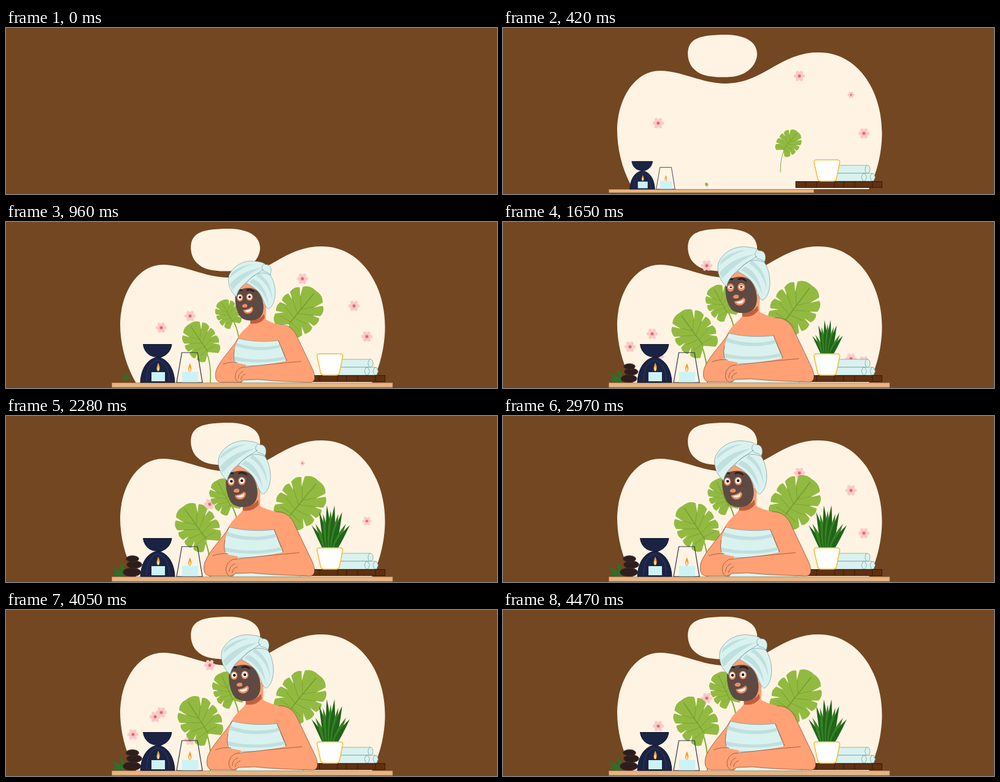
These frames come from a looping animation (800x272 px, 4.5 s). An HTML page:

```html
<!DOCTYPE html>
<html lang="en">
<head>
<meta charset="utf-8">
<title>Spa</title>
<style>
html, body { margin: 0; width: 100%; height: 100%; overflow: hidden; background: #734722; }
svg { display: block; width: 100%; height: 100%; }
.skin { fill: #ffa175; }
.line { fill: none; stroke: #7a4433; stroke-width: .7; stroke-linecap: round; }
.cloth { fill: #daf2ef; stroke: #6d979c; stroke-width: .7; }
.fold { fill: #bfe0df; }
.navy { fill: #1b2345; stroke: #11172e; }
.wax { fill: #cbf3f5; }
.wood { fill: #5f3113; stroke: #381a08; }
.stone { fill: #2d1e1d; stroke: #4a3532; stroke-width: .6; }
.stem { fill: none; stroke: #7fac38; stroke-width: 2; stroke-linecap: round; }
</style>
</head>
<body>
<svg viewBox="0 0 800 272" preserveAspectRatio="none">
<defs>
  <g id="leaf"></g>
  <g id="flower"></g>
  <g id="flame">
    <path d="M0-7Q3-1 2.600 2.500Q2 7 0 7T-2.600 2.500Q-2.500 0 0-7Z" fill="#f09a32"/>
    <path d="M0-1Q1.500 2 1.300 4Q1 6.500 0 6.500T-1.300 4Q-1.500 2 0-1Z" fill="#ffe9a8"/>
  </g>
</defs>
<rect width="800" height="272" fill="#734722"/>

<g id="blob" fill="#fff3e3">
  <path d="M212 264C195 235 186 200 186 167C187 115 215 70 256 70C290 70 325 91 362 91C425 91 450 40 515 40C576 40 617.500 100 617.500 172C617.500 210 606 245 596 264Z"/>
  <path d="M355 11C385 10 413 17 414 42C414 60 398 78 372 80C345 82 322 79 312 68C300 58 298 35 306 25C315 13 335 12 355 11Z"/>
</g>
<g id="petals"></g>

<g id="leafBack">
  <path class="stem" d="M358 133Q377 155 379 190Q381 208 386 222"/>
  <use href="#leaf" transform="translate(358 133) rotate(-28) scale(.62)"/>
</g>
<g id="leafRight">
  <path class="stem" d="M477 142Q451 172 452 236"/>
  <use href="#leaf" transform="translate(477 142) rotate(38) scale(.94)"/>
</g>
<g id="leafLeft">
  <path class="stem" d="M312 183Q334 212 333 263"/>
  <use href="#leaf" transform="translate(312 183) rotate(-36) scale(.84)"/>
</g>

<g id="tray">
  <g class="cloth">
    <path d="M545 225H594V238H545Z"/><ellipse cx="594" cy="231.500" rx="4" ry="6.500"/>
    <path d="M538 238H602V251H538Z"/>
    <path id="hex" d="M584 244.500L586.500 238.500H590L592.500 244.500L590 250.500H586.500Z"/>
    <use href="#hex" x="14"/>
  </g>
  <rect class="wood" x="477" y="251.500" width="140.500" height="10"/>
  <path d="M493 251V261M511 251V261M540 251V261M555 251V261M573 251V261M602 251V261" stroke="#381a08"/>
</g>
<g id="plant"></g>
<g id="pot">
  <path d="M511 216H544Q549.500 216 548.500 221L543.500 246Q542.500 251 538 251H518Q513.500 251 512.500 246L507 221Q506 216 511 216Z" fill="#fff" stroke="#f0bd35" stroke-width="1.500"/>
</g>

<g id="sprig" fill="#2c702b">
  <path d="M195 262Q178 260 174 249Q187 250 195 262Z"/>
  <path d="M195 262Q184 250 187 240Q195 250 195 262Z"/>
  <path d="M195 262Q182 265 173 259Q184 255 195 262Z"/>
</g>
<g id="stones" class="stone">
  <ellipse cx="205" cy="256" rx="14.500" ry="7.300"/>
  <ellipse cx="209" cy="243.500" rx="12.500" ry="6.500"/>
  <ellipse cx="206" cy="234" rx="10.500" ry="5.300"/>
</g>

<g id="woman">
  <path class="skin" d="M386 143L387 153Q382 160 374 167Q364 176 358 192L354 226H452L470 180Q468 164 448 159Q422 153 414 147L415 118H390Z"/>
  <path fill="#c25f3c" d="M386 147Q401 151 411 137L412 145Q404 157 386 155Z"/>
  <path class="cloth" d="M364 182C385 188 415 189 437 186L451 222V232H356Q352 205 364 182Z"/>
  <path class="fold" d="M361 190Q400 204 440 193L442 198Q400 210 359 196ZM356 215Q400 226 449 215L451 220Q410 230 356 222Z"/>
  <path class="cloth" d="M368 254H480V264H368Z"/>
  <path class="skin" d="M364 182C354 199 331 221 324 240C321 252 323 261 332 262H372L378 230L357 226Q353 205 364 182Z"/>
  <path class="line" d="M364 182C354 199 331 221 324 240C321 252 323 261 332 262H370M357 203Q354 222 359 226M337 229Q350 224 362 226"/>
  <path class="skin" d="M430 159C452 154 464 163 471 179L499 238C505 252 504 262 495 262Q440 261 400 257L374 258Q367 263 364 262Q357 257 359 248Q361 239 370 235Q420 230 453 223L451 220L437 186Z"/>
  <path class="line" d="M440 157C455 156 465 165 471 179L499 238C505 252 504 262 495 262Q440 261 400 257L374 258Q367 263 364 262Q357 257 359 248Q361 239 370 235Q420 229 478 224M437 186L452 222M364 255Q364 246 373 242M369 257Q369 250 377 247"/>
  <path class="skin" d="M360 100Q366 86 379 80Q402 88 410 114L408 140H385Z"/>
  <path d="M359 101Q364 92 373 91Q388 87 399 95Q405 102 408 112C412 126 410 139 402 145C393 151 380 150 372 146C361 139 357 115 359 101Z" fill="#5e4a43"/>
  <path d="M360 97Q364 92 370 94M380 94Q386 91 392 96" fill="none" stroke="#2a1d1c" stroke-width="2.600" stroke-linecap="round"/>
  <g fill="#f28c60">
    <ellipse cx="367" cy="107.500" rx="5.600" ry="6.700"/><ellipse cx="384.500" cy="106.500" rx="6" ry="6.700"/>
    <path d="M371 122Q374 117 380 120Q382 125 377 125.500Q371 126 371 122Z"/>
    <path d="M373 130Q383 129 388 124Q393 126 390 132Q386 138 379 136.500Q374 135 373 130Z"/>
  </g>
  <path d="M376 131Q384 130.500 388 127Q389 131 385 133Q379 135 376 131Z" fill="#fff"/>
  <g id="eyes">
    <ellipse cx="367" cy="107" rx="3.900" ry="4.800" fill="#fff"/><ellipse cx="384.500" cy="106" rx="4.200" ry="4.800" fill="#fff"/>
    <circle cx="367.500" cy="107" r="2.300" fill="#2a1712"/><circle cx="384.500" cy="106" r="2.300" fill="#2a1712"/>
  </g>
  <path class="cloth" d="M361 106C350 97 344 82 347 68C353 50 375 38 394 41C405 42 411 44 413 47C424 46 426 58 422 66C430 78 433 96 430 110C428 121 422 128 418 128C412 124 410 110 404 101C398 92 388 86 379 81C370 86 362 96 361 106Z"/>
  <path class="fold" d="M349 83Q370 58 406 53Q377 66 353 93ZM352 62Q370 47 392 46Q370 52 349 71ZM390 73Q414 83 419 120Q409 91 384 79ZM402 64Q425 78 426 112Q420 82 397 68Z"/>
  <path class="line" d="M379 81C388 68 400 57 422 66M361 104Q364 85 410 56M410 46Q403 53 411 60Q419 61 423 66" style="stroke:#6d979c"/>
</g>

<g id="table">
  <rect x="172.500" y="263.500" width="457.500" height="7.500" fill="#e9b481" stroke="#a8703f" stroke-width=".6"/>
  <path class="navy" d="M223.500 200.500H270Q268 216 253 221.500Q241 222 234 218Q225 212 223.500 200.500Z"/>
  <path class="navy" d="M247 221.500C264 224 274 241 275 263H219C220 241 230 224 247 221.500Z"/>
  <path d="M229 261Q229 231 247 226Q266 231 266 261" fill="none" stroke="#36406a" stroke-width=".8"/>
  <path class="wax" d="M237 246H259V261H237Z"/>
  <use href="#flame" x="248" y="237.500"/>
  <path d="M286.500 214H312L320 263H278Z" fill="none" stroke="#2c3448" stroke-width="1.200"/>
  <path class="wax" d="M287 245.500H313V262.500H287Z"/>
  <use href="#flame" x="299.500" y="238.500"/>
</g>
</svg>
<script>
const LOOP = 4500;
const $ = id => document.getElementById(id);
const clamp = u => Math.min(1, Math.max(0, u));
const outCubic = u => 1 - (1 - clamp(u)) ** 3;
const outBack = (u, s) => {
  const v = clamp(u) - 1;
  return 1 + (s + 1) * v ** 3 + s * v * v;
};
const wave = (t, start, period) => Math.sin(2 * Math.PI * (t - start) / period);
const repeat = (n, make) => Array.from({ length: n }, (_, i) => make(i)).join("");

// Scale, turn and shift a group about a fixed point
function grow(id, x, y, k, turn = 0, dx = 0) {
  const el = $(id);
  el.style.display = k > .01 ? "" : "none";
  el.setAttribute("transform",
    `translate(${x + dx} ${y}) rotate(${turn}) scale(${k}) translate(${-x} ${-y})`);
}

// Half a leaf: five lobes around a centre, split by narrow notches
function halfLeaf() {
  const step = .56;
  const rim = a => 43 + 6 * Math.cos(2 * a);
  const at = (a, k = 1) => `${rim(a) * k * Math.sin(a)} ${-rim(a) * k * Math.cos(a)}`;
  return "M0 28L0 -49" + repeat(5, i => {
    const a = i * step, b = a + step;
    return `L${at(i ? a + .1 : 0)}Q${at(a + step / 2, 1.1)} ${at(b - .06)}L${i < 4 ? at(b + .05, .5) : "0 28"}`;
  }) + "Z";
}
const half = `<path d="${halfLeaf()}" fill="#92ba41" stroke="#92ba41" stroke-width="2" stroke-linejoin="round"/>` +
  `<path d="M0-6L15-24M0 4L25-12M0 14L26 8M0 24L22 26" stroke="#78a232"/>`;
$("leaf").innerHTML = half + `<g transform="scale(-1 1)">${half}</g><path d="M0-44V28" stroke="#759f30" stroke-width="1.800"/>`;

$("flower").innerHTML = repeat(6, i =>
  `<ellipse cx="5.300" rx="4" ry="3" fill="#fbcaca" transform="rotate(${i * 60})"/>`) +
  `<circle r="3.400" fill="#f3a9a9"/><circle r="2" fill="#c9686b"/>`;

// A fan of blades, tallest in the middle
$("plant").innerHTML = repeat(11, i => {
  const u = i / 5 - 1, x = 529 + 31 * u, y = 145 + 34 * u * u + i % 2 * 10;
  const root = 528 + 9 * u, bend = 528 + 14 * u, mid = y * .4 + 130;
  return `<path d="M${root - 3} 218Q${bend - 6} ${mid} ${x} ${y}Q${bend + 7} ${mid + 2} ${root + 3} 218Z" fill="${i % 2 ? "#37821f" : "#20641d"}"/>`;
});

// Each flower appears, falls faster and faster, then comes once more
const flowers = [
  { x: 253, y: 154, start: 160, again: 3210, pull: 30 },
  { x: 483, y: 77, start: 160, again: 2000, pull: 25 },
  { x: 588, y: 171, start: 160, again: 1910, pull: 26 },
  { x: 567, y: 108, start: 260, again: 2230, pull: 60 },
  { x: 300, y: 151, start: 690, again: 2150, pull: 42 },
  { x: 243, y: 145, start: 950, again: 2480, pull: 78 },
  { x: 207, y: 195, start: 1270, again: 2410, pull: 65 },
  { x: 332, y: 46, start: 1000, again: 2190, pull: 60 }
];
$("petals").innerHTML = repeat(flowers.length, () => `<use href="#flower"/>`);
const petals = [...$("petals").children];

function drawFlower(f, el, t) {
  const age = t - f.start - (t > f.start + f.again ? f.again : 0);
  const y = f.y + f.pull * 1e-6 * age * age;
  const shown = age > 0 && y < 256;
  el.style.display = shown ? "" : "none";
  if (shown) el.setAttribute("transform", `translate(${f.x} ${y}) scale(${clamp(age / 260)})`);
}

function draw(t) {
  const slow = start => outCubic((t - start) / 1300);
  const pop = (start, time, over = 1.5) => outBack((t - start) / time, over);
  grow("blob", 401, 264, pop(20, 400, 1.7));
  grow("tray", 560, 262, pop(60, 340));
  grow("pot", 528, 251, pop(80, 330));
  grow("table", 173, 267, pop(328, 420));
  grow("leafRight", 452, 236, slow(150), 1.5 * wave(t, 1965, 1670));
  grow("leafLeft", 333, 263, slow(385), 2 + 2 * wave(t, 2725, 3500));
  grow("leafBack", 386, 222, slow(420), 1 + 2 * wave(t, 2750, 6500));
  grow("sprig", 208, 254, slow(640));
  grow("stones", 206, 263, slow(945));
  grow("plant", 528, 217, slow(1110));
  grow("woman", 438, 267, outCubic((t - 430) / 1000), 0, 2.6 + 4.2 * wave(t, -100, 3850));
  const blink = .5 * Math.max(0, 1 - Math.abs(t - 1650) / 120);
  $("eyes").setAttribute("transform", `translate(0 ${107 * blink}) scale(1 ${1 - blink})`);
  flowers.forEach((f, i) => drawFlower(f, petals[i], t));
}

const begin = performance.now();
function tick() {
  draw((performance.now() - begin) % LOOP);
  requestAnimationFrame(tick);
}
draw(0);
requestAnimationFrame(tick);
</script>
</body>
</html>
```
